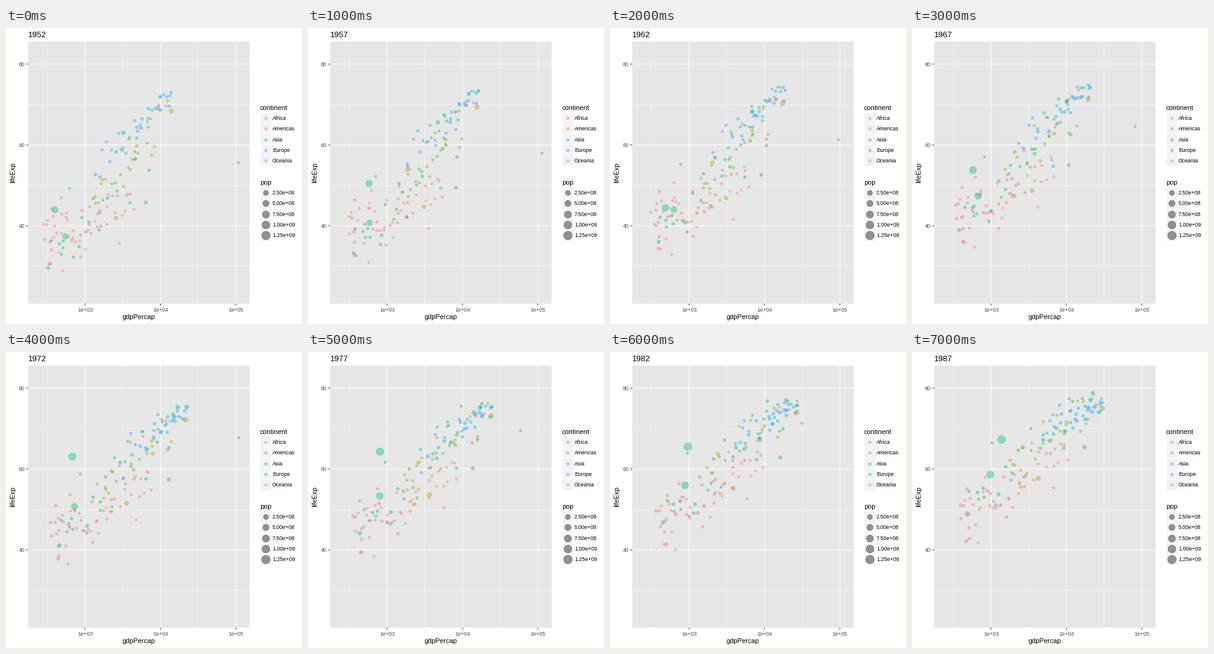
Recreate the animation shown at these times as a matplotlib script. Size 480 px wide and 480 px high, loop 8 s.

```python
import numpy as np
import matplotlib.pyplot as plt
from matplotlib.animation import FuncAnimation
from matplotlib.patches import Rectangle

STEPS = 8
PT = 72 / 80            # points per pixel at 80 dpi
ALPHA = 0.4
COLORS = {"Africa": "#F8766D", "Americas": "#A3A500", "Asia": "#00BF7D",
          "Europe": "#00B0F6", "Oceania": "#E76BF3"}
LEFT, TOP, RIGHT, BOTTOM = 36, 22, 395, 447
KEY = 17.28             # legend key size

rng = np.random.default_rng(12)
time = np.linspace(0, 1, STEPS)


def px_x(log_income):
    return 128.2 + 122.3 * (np.asarray(log_income) - 3)


def px_y(life):
    return 189.7 - 6.56 * (np.asarray(life) - 60)


def radius(millions):
    share = np.clip(np.asarray(millions) / 1318.7, 0, 1)
    return 0.375 * (1 + 5 * np.sqrt(share)) * 2.845 + 0.6


def area(r):
    return (2 * r * PT) ** 2


def mix(a, b, t):
    return a + (b - a) * t


def cloud(name, count, people, income, life, skew=1, scatter=4):
    """Countries strung along a rising line whose two ends drift in time.

    income and life each hold (low end, high end) for the first and last step.
    """
    rank = ((np.arange(count) + 0.5) / count) ** skew
    noise = scatter * np.clip(rng.normal(size=count), -1.8, 1.8)
    size = people * np.exp(rng.normal(0, 1, count))
    for k in range(count):
        x0, x1 = (mix(*ends, rank[k]) for ends in income)
        y0, y1 = (mix(*ends, rank[k]) for ends in life)
        x = mix(x0, x1, time ** 0.75) + rng.normal(0, 0.04)
        x = x + rng.normal(0, 0.015, STEPS)
        y = mix(y0, y1, time ** 0.9) + noise[k] * mix(1, 0.85, time)
        y = np.minimum(y + rng.normal(0, 0.25, STEPS), 73 + 4.4 * time)
        yield name, x, y, size[k] * 1.02 ** (35 * time)


def path(name, people, *keys):
    """One country through a few (step, income, life) points."""
    step, income, life = zip(*keys)
    at = np.arange(STEPS)
    return (name, np.interp(at, step, np.log10(income)),
            np.interp(at, step, life), mix(*people, time))


countries = [
    *cloud("Africa", 52, 3.5, [(2.48, 3.67), (2.62, 4.05)],
           [(36.5, 46), (47.5, 65)], skew=1.55, scatter=5),
    *cloud("Americas", 24, 5, [(3.13, 4.05), (3.26, 4.43)],
           [(43, 67), (59, 77)], skew=1.15),
    *cloud("Asia", 29, 8, [(2.52, 3.9), (2.65, 4.35)],
           [(36, 57), (54, 75)], scatter=5.5),
    *cloud("Europe", 30, 9, [(3.05, 4.17), (3.6, 4.48)],
           [(54, 73), (69, 76.5)], skew=0.65, scatter=2),
    *cloud("Oceania", 2, 5, [(4.0, 4.02), (4.28, 4.34)],
           [(69.1, 69.4), (74.5, 76)], scatter=0.2),
    path("Asia", (556, 1084), (0, 400, 44), (1, 576, 50.5), (2, 488, 44.5),
         (4, 677, 63.1), (6, 962, 65.5), (7, 1379, 67.3)),
    path("Asia", (372, 788), (0, 547, 37.4), (4, 724, 50.7), (7, 977, 58.6)),
    path("Asia", (86, 122), (0, 3217, 63), (4, 14779, 73.4), (7, 22376, 78.7)),
    path("Asia", (0.2, 2), (0, 108382, 55.6), (1, 113523, 58),
         (3, 80895, 64.6), (4, 109348, 67.7), (6, 31354, 71.3),
         (7, 28118, 74.2)),
    path("Americas", (157, 243), (0, 13990, 68.4), (7, 29884, 75)),
]
rng.shuffle(countries)

names, incomes, lives, people = zip(*countries)
xs, ys = px_x(incomes), px_y(lives)
sizes = area(radius(people))

plt.rcParams["font.family"] = "Liberation Sans"
fig = plt.figure(figsize=(6, 6), dpi=80, facecolor="white")
ax = fig.add_axes([0, 0, 1, 1])
ax.set_xlim(0, 480)
ax.set_ylim(480, 0)
ax.axis("off")


def box(x, y, w, h, color, edge="none"):
    ax.add_patch(Rectangle((x, y), w, h, facecolor=color, edgecolor=edge,
                           linewidth=0.8 * PT, zorder=0))


def line(x, y, color="white", width=1.07):
    ax.plot(x, y, color=color, lw=width * PT, zorder=1, snap=False,
            solid_capstyle="butt")


def label(x, y, s, size=8.8, color="black", **kw):
    return ax.text(x, y, s, fontsize=size * PT, color=color, **kw)


def dots(x, y, s, color):
    return ax.scatter(x, y, s=s, c=color, alpha=ALPHA,
                      linewidths=0.71 * PT, zorder=3)


def legend(heading, top, entries):
    label(412, top - 4.5, heading, 11)
    for k, (text, r, color) in enumerate(entries):
        y = top + KEY * k
        box(412.3, y, KEY, KEY, "#F2F2F2", "white")
        dots([412.3 + KEY / 2], [y + KEY / 2], area(r), color)
        label(432, y + KEY / 2 + 3.2, text)


# Panel, grid and axes
box(LEFT, TOP, RIGHT - LEFT, BOTTOM - TOP, "#E6E6E6")
for v in (2.5, 3.5, 4.5):
    line([px_x(v)] * 2, [TOP, BOTTOM], width=0.53)
for v in (30, 50, 70):
    line([LEFT, RIGHT], [px_y(v)] * 2, width=0.53)
for v in (3, 4, 5):
    x = px_x(v)
    line([x, x], [TOP, BOTTOM])
    line([x, x], [BOTTOM, BOTTOM + 2.8], "#333333")
    label(x, 460, f"1e+{v:02d}", color="#4D4D4D", ha="center")
for v in (40, 60, 80):
    y = px_y(v)
    line([LEFT, RIGHT], [y, y])
    line([LEFT - 2.8, LEFT], [y, y], "#333333")
    label(30.7, y + 3.2, str(v), color="#4D4D4D", ha="right")
label(215.5, 472, "gdpPercap", 11, ha="center")
label(16, 234, "lifeExp", 11, rotation=90, ha="right", va="center")
title = label(LEFT, 15, "1952", 13.2)

legend("continent", 137.3, [(n, 2.2, c) for n, c in COLORS.items()])
legend("pop", 258.3, [(f"{m * 1e6:.2e}", radius(m), "black")
                      for m in range(250, 1251, 250)])

points = dots(xs[:, 0], ys[:, 0], sizes[:, 0], [COLORS[n] for n in names])


def update(i):
    title.set_text(str(1952 + 5 * i))
    points.set_offsets(np.column_stack([xs[:, i], ys[:, i]]))
    points.set_sizes(sizes[:, i])
    return title, points


anim = FuncAnimation(fig, update, frames=STEPS, interval=1000, repeat=True,
                     repeat_delay=0, blit=False)
plt.show()
```
